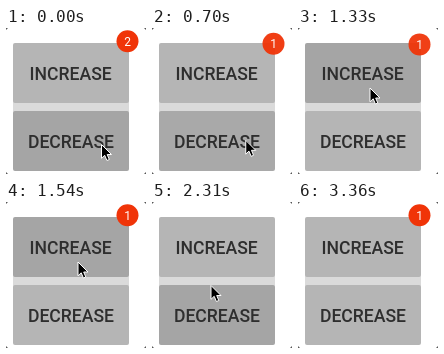
Recreate the animation shown at these times as an HTML page. Size 140 by 146 pixels, loop 3570 ms.

```html
<!DOCTYPE html>
<html lang="en">
<head>
<meta charset="utf-8">
<title>Counter badge</title>
<style>
  html, body { margin: 0; width: 100%; height: 100%; overflow: hidden; background: #fff; }
  svg { display: block; width: 140px; height: 146px; }
  text { font: 500 17.6px Roboto, Arial, sans-serif; text-anchor: middle; fill: #2e2e2e; }
  #badge text { font-size: 12px; font-weight: 400; fill: #fff; }
</style>
</head>
<body>
<svg viewBox="0 0 140 146">
  <path d="M0 0h2L0 2zM140 0v2l-2-2zM0 146v-2l2 2zM140 146h-2l2-2z" fill="#555"/>
  <rect x="7" y="73" width="116" height="12" fill="#dadada"/>
  <rect id="inc" x="7" y="15" width="116" height="60" rx="2"/>
  <rect id="dec" x="7" y="83" width="116" height="60" rx="2"/>
  <text x="64.7" y="52">INCREASE</text>
  <text x="65" y="119.5">DECREASE</text>
  <g id="badge">
    <circle r="11" fill="#f03408"/>
    <text id="count" y="4.3">1</text>
  </g>
  <path id="cursor" d="M0 0V13.8L3.2 10.8L5.4 16L7.8 15L5.7 10H10Z" fill="#000" stroke="#fff"/>
</svg>
<script>
const LOOP = 3570, LAST = 3360, STEP = 70, FLY = 300, FADE = 150;
const [inc, dec, badge, count, cursor] =
  ['inc', 'dec', 'badge', 'count', 'cursor'].map(id => document.getElementById(id));

const clicks = { firstDown: 590, firstUp: 1150, secondDown: 2000, secondUp: 2668 };

// Spans of time in which each button is dark and the badge is shown.
const incDark = [[clicks.firstUp, clicks.secondDown + 70], [clicks.secondUp, 3000]];
const decDark = [[-FADE, 200], [clicks.firstDown, 800], [clicks.secondDown + 70, 2590]];
const badgeOn = [
  [-FLY, clicks.firstDown],
  [clicks.firstUp, clicks.secondDown],
  [clicks.secondUp, Infinity]
];

// Cursor moves: begin, end, x, y.
const home = [95.5, 116.5];
const moves = [
  [630, 1050, 72, 60],
  [1540, 1890, 58, 121],
  [2170, 2450, 60, 46],
  [2870, 3300, 84, 150]
];

const clamp = v => Math.min(1, Math.max(0, v));
const cubicOut = p => 1 - (1 - p) ** 3;
const smooth = p => p * p * (3 - 2 * p);

// 0 to 1: how far a state is on, ramping at both ends of each span.
const level = (spans, t, ramp) => Math.max(...spans.map(([from, to]) =>
  Math.min(clamp((t - from) / ramp), clamp(1 - (t - to) / ramp))));

function cursorAt(t) {
  return moves.reduce(([x, y], [begin, end, toX, toY]) => {
    const e = smooth(clamp((t - begin) / (end - begin)));
    return [x + (toX - x) * e, y + (toY - y) * e];
  }, home);
}

function shade(button, spans, t) {
  const v = Math.round(181 - 16 * level(spans, t, FADE));
  button.setAttribute('fill', `rgb(${v},${v},${v})`);
}

function paint(now) {
  const t = Math.min(LAST, Math.floor(now % LOOP / STEP) * STEP);
  shade(inc, incDark, t);
  shade(dec, decDark, t);

  const e = cubicOut(level(badgeOn, t, FLY));
  badge.setAttribute('transform', `translate(121.5 ${13.2 + 50 * (1 - e)})`);
  badge.setAttribute('opacity', e);
  count.textContent = t < STEP ? 2 : 1;
  cursor.setAttribute('transform', `translate(${cursorAt(t)})`);
}

const start = performance.now();
function tick() {
  paint(performance.now() - start);
  requestAnimationFrame(tick);
}
tick();
</script>
</body>
</html>
```
